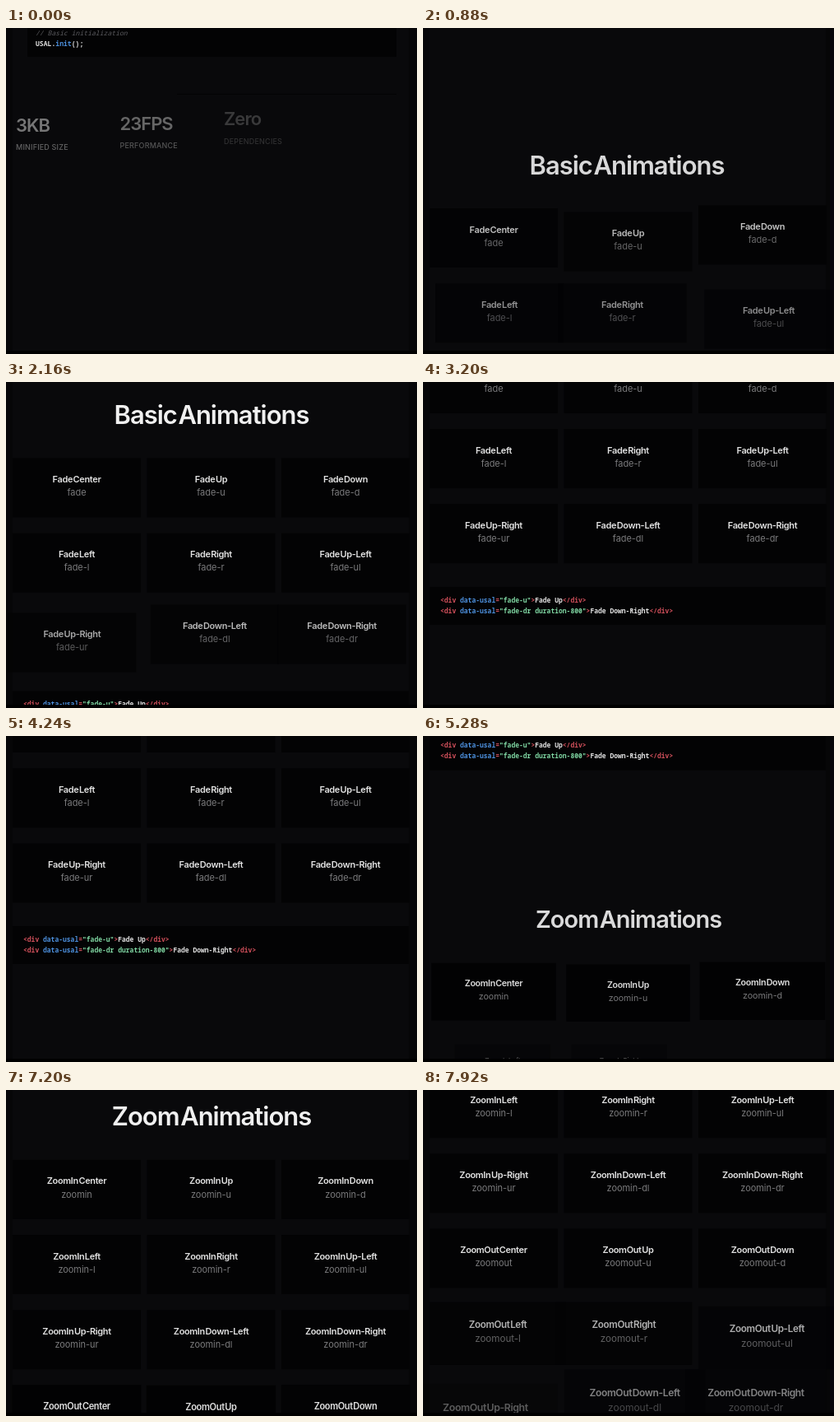
These frames come from a looping animation (500 by 396 pixels, 8000 ms). An HTML page with a canvas:

```html
<!DOCTYPE html>
<html lang="en">
<head>
<meta charset="utf-8">
<title>Scroll animations</title>
<style>
  html, body { margin: 0; width: 100%; height: 100%; overflow: hidden; background: #09090b; }
  canvas { display: block; }
</style>
</head>
<body>
<canvas id="stage" width="500" height="396"></canvas>
<script>
const ctx = document.getElementById('stage').getContext('2d');
const LOOP = 8000;
const SANS = 'Inter, "Open Sans", sans-serif';
const MONO = '"Noto Sans Mono", "DejaVu Sans Mono", monospace';
const BLACK = '#030304', RED = '#cf4f5a', BLUE = '#4c8fdc', GREEN = '#7fd6a2', WHITE = '#e2e2e2';

// Page scroll: each wheel notch moves the page by one eased step.
const NOTCHES = [280, 390, 510, 1630, 1790, 2780, 2920, 4150, 4300, 4450, 4950,
                 6000, 6070, 6170, 7320, 7400, 7560];
const STEP = 63.29, GLIDE = 260, SHIFT = 14;

const clamp = x => Math.max(0, Math.min(1, x));
const smooth = x => x * x * (3 - 2 * x);
const scrollAt = t =>
  356.9 - STEP * NOTCHES.reduce((sum, n) => sum + smooth(clamp((t - n) / GLIDE)), 0);
// Share of an entrance still to go, 1 to 0.
const remaining = (t, start, length = 1000) => (1 - clamp((t - start) / length)) ** 2;
const opacity = r => 1 - r ** 1.5;

function enterTime(y, limit) {
  for (let t = 0; t < LOOP; t += 10) if (y + scrollAt(t) < limit) return t;
  return LOOP;
}

const DIRS = [['Center', ''], ['Up', 'u'], ['Down', 'd'], ['Left', 'l'], ['Right', 'r'],
              ['Up-Left', 'ul'], ['Up-Right', 'ur'], ['Down-Left', 'dl'], ['Down-Right', 'dr']];

function makeCards(name, top, scale) {
  return DIRS.map(([dir, key], i) => {
    const toward = (plus, minus) => SHIFT * (key.includes(plus) - key.includes(minus));
    const y = top + Math.floor(i / 3) * 91.2;
    const dy = toward('u', 'd');
    return {
      title: name + ' ' + dir,
      label: name.toLowerCase() + (key && '-' + key),
      x: 86 + (i % 3) * 163.5, y, scale,
      dx: toward('l', 'r'), dy,
      start: enterTime(y + dy, 399)
    };
  });
}

const cards = [
  ...makeCards('Fade', 78, 1),
  ...makeCards('ZoomIn', 640, 0.67),
  ...makeCards('ZoomOut', 913.5, 1.17)
];
const headings = [
  { text: 'Basic Animations', y: 1.3, dx: -9, scale: 1, length: 1000 },
  { text: 'Zoom Animations', y: 563.3, dx: 0, scale: 0.67, length: 1400 }
].map(h => ({ ...h, start: enterTime(h.y, 349) }));

function text(str, x, y, font, color, align = 'center', spacing = 0, wordGap = 0) {
  ctx.font = font;
  ctx.fillStyle = color;
  ctx.textAlign = align;
  ctx.letterSpacing = spacing + 'px';
  ctx.wordSpacing = wordGap + 'px';
  ctx.fillText(str, x, y);
}

// Tight semi-bold text with a narrow word gap.
const title = (str, y, size, color) =>
  text(str, 0, y, `600 ${size}px ${SANS}`, color, 'center', -0.033 * size, -0.17 * size);

function box(x, y, w, h, color = BLACK) {
  ctx.fillStyle = color;
  ctx.fillRect(x, y, w, h);
}

function codeLine(x, y, parts, style = 'bold 8px ') {
  for (const [str, color] of parts) {
    text(str, x, y, style + MONO, color, 'left');
    x += ctx.measureText(str).width;
  }
}

const divLine = (value, body) => [
  ['<div ', RED], ['data-usal', BLUE], ['=', RED], ['"' + value + '"', GREEN],
  ['>', RED], [body, WHITE], ['</div>', RED]
];

function drawIntro(t) {
  box(26, -420, 449, 98);
  codeLine(36, -350, [['// Basic initialization', '#5c5c60']], 'italic 8.1px ');
  codeLine(36, -337, [['USAL.', WHITE], ['init', BLUE], ['();', WHITE]], 'bold 8.1px ');
  box(208, -277, 267, 1);
  const fps = Math.floor(60 * clamp((t + 390) / 1000));
  const stats = [['3KB', 'MINIFIED SIZE', -500], [fps + 'FPS', 'PERFORMANCE', -400],
                 ['Zero', 'DEPENDENCIES', -180]];
  stats.forEach(([value, label, start], i) => {
    const r = remaining(t, start), x = 12 + i * 126.5;
    ctx.globalAlpha = 1 - r;
    text(value, x, -233 - 18 * r, '600 22px ' + SANS, '#9a9a9a', 'left', -0.99);
    text(label, x, -207 - 18 * r, '500 9px ' + SANS, '#808080', 'left', 0.18);
  });
  ctx.globalAlpha = 1;
}

// Draws an entering element around its own centre.
function entering(item, t, x, y, draw) {
  if (t < item.start) return;
  const r = remaining(t, item.start, item.length);
  const s = 1 + (item.scale - 1) * r;
  ctx.save();
  ctx.globalAlpha = opacity(r);
  ctx.translate(x + item.dx * r, y + (item.dy || 0) * r);
  ctx.scale(s, s);
  draw();
  ctx.restore();
}

function drawHeading(h, t) {
  entering(h, t, 250, h.y, () => title(h.text, 0, 31, '#f0f0f0'));
}

function drawCard(c, t) {
  entering(c, t, c.x, c.y + 8, () => {
    box(-78, -34, 156, 72);
    title(c.title, -7.7, 11, WHITE);
    text(c.label, 0, 8.5, '400 11px ' + SANS, '#7a7a7c', 'center', -0.05);
  });
}

function render(t) {
  box(0, 0, 500, 396, '#09090b');
  box(0, 0, 8, 396, '#060607');
  box(490, 0, 10, 396, '#060607');
  ctx.textBaseline = 'middle';
  ctx.save();
  ctx.translate(0, scrollAt(t));
  drawIntro(t);
  box(8, 335, 482, 46);
  codeLine(21, 351.5, divLine('fade-u', 'Fade Up'));
  codeLine(21, 364.5, divLine('fade-dr duration-800', 'Fade Down-Right'));
  headings.forEach(h => drawHeading(h, t));
  cards.forEach(c => drawCard(c, t));
  ctx.restore();
  box(0, 392, 500, 4, '#000');
}

const begin = performance.now();
function frame() {
  render((performance.now() - begin) % LOOP);
  requestAnimationFrame(frame);
}
frame();
</script>
</body>
</html>
```
